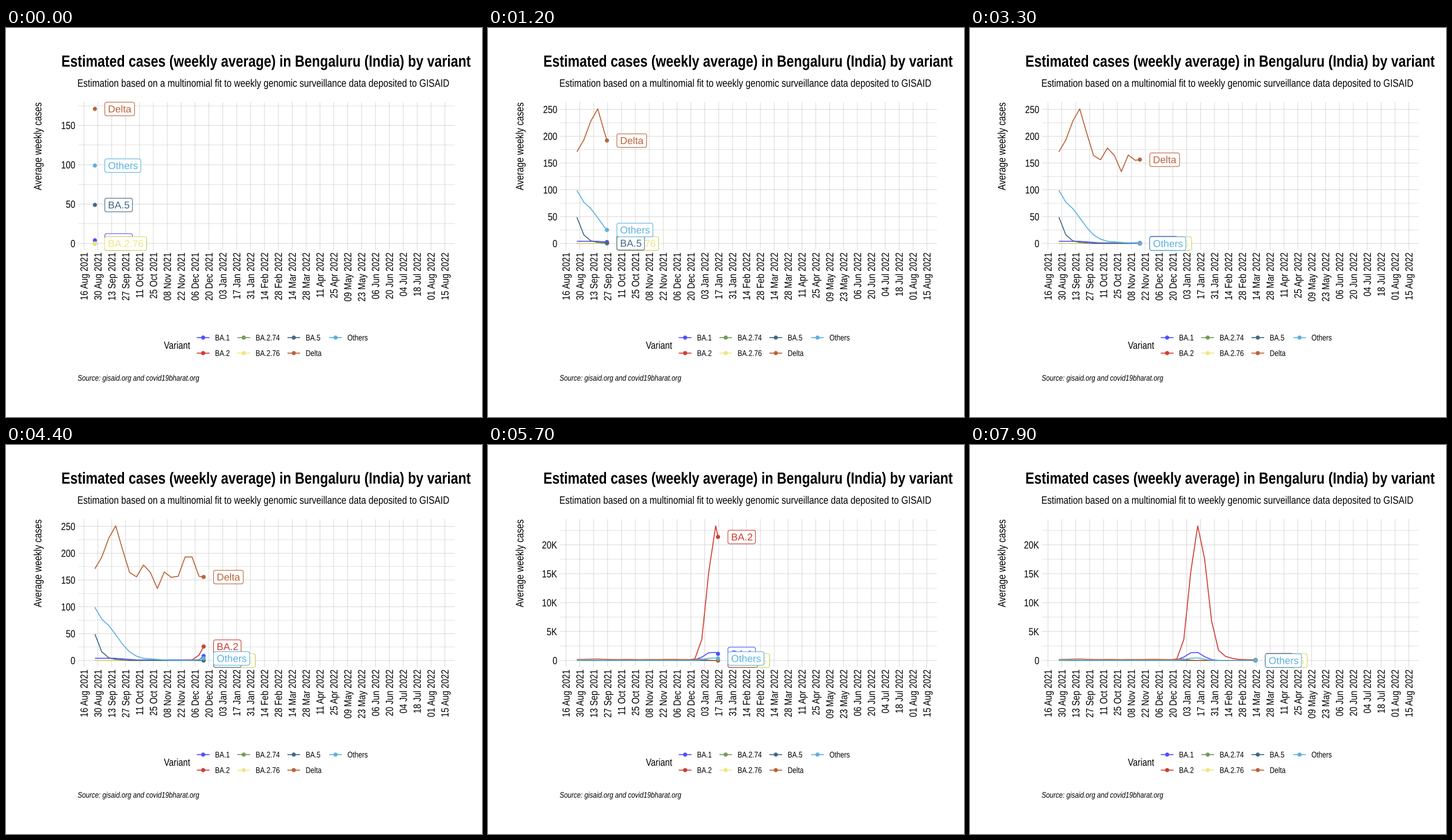
These frames come from a looping animation (827x677 px, 8 s). A matplotlib script:

```python
import math

import matplotlib.pyplot as plt
import numpy as np
from matplotlib.animation import FuncAnimation
from matplotlib.patches import Circle, FancyBboxPatch, PathPatch
from matplotlib.textpath import TextPath
from matplotlib.transforms import Affine2D

W, H, DPI = 827, 677, 100
FRAMES, INTERVAL = 80, 100
PX = 72 / DPI            # one pixel in points
PT = 1.565               # pixels per typographic point of the layout
NARROW = 0.82            # condensed face

LEFT, RIGHT, TOP, BOTTOM = 125, 780, 129, 386.7
TICK0, DAY = 135.5, 24.115 / 14
START = TICK0 + 11 * DAY
WEEK = np.arange(30)
KEYS = np.round(2.8 * WEEK)   # each weekly value is pinned to a whole frame

COLORS = {"BA.1": "#5050FF", "BA.2": "#CE3D32", "BA.2.74": "#749B58",
          "BA.2.76": "#F0E685", "BA.5": "#466983", "Delta": "#BA6338",
          "Others": "#5DB1DD"}


def wave(peak, height, rise, fall=None, power=2):
    """Bell curve over the weeks, with its own width on each side."""
    d = WEEK - peak
    width = np.where(d < 0, rise, fall or rise)
    return height * np.exp(-np.abs(d / width) ** power)


def falloff(level, middle, rate):
    return level / (1 + np.exp(rate * (WEEK - middle)))


def weekly_cases():
    cases = {name: 0.0 * WEEK for name in COLORS}
    cases["BA.1"] = 1 + falloff(3, 4.5, 2) + wave(19.55, 1500, 1.6)
    cases["BA.2"] = (wave(20, 23260, 1.5, 1.78, 2.15) + wave(16, 28, 1)
                     + wave(23.3, 700, 1.8) + wave(27, 120, 2.5))
    cases["BA.5"] = 49 * np.exp(-1.1 * WEEK)
    cases["Delta"] = (falloff(155, 18.8, 3) + wave(1.05, 26.5, 1.4)
                      + wave(2.95, 92, 1.35) + wave(7.3, 28, 0.7)
                      - wave(9, 21, 0.6) + wave(10, 11, 0.4)
                      + wave(13.5, 56, 0.8) + wave(18, 110, 0.6))
    cases["Others"] = (wave(0, 35.5, 0.75) + wave(1, 70, 3) + wave(5, 4, 4)
                       + wave(16, 4, 1) + wave(19.6, 470, 1.5))
    return {name: np.round(v) for name, v in cases.items()}


CASES = weekly_cases()

fig = plt.figure(figsize=(W / DPI, H / DPI), dpi=DPI, facecolor="white")
ax = fig.add_axes([0, 0, 1, 1])
ax.set_xlim(0, W)
ax.set_ylim(H, 0)
ax.axis("off")


def text(s, x, y, px, ha=0, rot=0, color="black", narrow=NARROW, z=3,
         weight="normal", style="normal"):
    font = dict(family="Liberation Sans", weight=weight, style=style)
    path = TextPath((0, 0), s, size=px, prop=font)
    width = path.get_extents().x1
    place = (Affine2D().translate(-ha * width, 0).scale(narrow, -1)
             .rotate_deg(rot).translate(x, y))
    patch = PathPatch(place.transform_path(path), fc=color, lw=0, zorder=z)
    return ax.add_patch(patch), width


def line(xs, ys, color, px, z):
    return ax.plot(xs, ys, color=color, lw=px * PX, zorder=z, snap=False,
                   solid_capstyle="butt", solid_joinstyle="round")[0]


def grid(xs, ys, px=0.75):
    return line(xs, ys, "#cccccc", px, 1)


def dot(x, y, color, z):
    return ax.add_patch(Circle((x, y), 3.6, fc=color, lw=0, zorder=z))


def tag(name, x, y, z):
    color, size, pad = COLORS[name], 17.4, 5.5
    label, width = text(name, x + pad, y + 0.355 * size, size,
                        color=color, narrow=1, z=z + 0.01)
    box = FancyBboxPatch((x, y - 11.6), width + 2 * pad, 23.6,
                         boxstyle="round,pad=0,rounding_size=3.5",
                         fc="white", ec=color, lw=1.1 * PX, zorder=z)
    return ax.add_patch(box), label


def nice_step(lo, hi, target=5):
    """Tick step with the best mix of simplicity, coverage and density."""
    span, best = hi - lo, (-math.inf, 1)
    mag = math.floor(math.log10(span))
    for z in (mag - 1, mag):
        for i, q in enumerate((1, 5, 2, 2.5, 4, 3)):
            step = q * 10.0 ** z
            for first in (-step, 0):
                for k in range(2, 13):
                    last = first + step * (k - 1)
                    miss = (hi - last) ** 2 + (lo - first) ** 2
                    cover = 1 - 0.5 * miss / (0.1 * span) ** 2
                    ratio = (max(last, hi) - min(first, lo)) / (target - 1) / step
                    dense = 2 - max(ratio, 1 / ratio)
                    score = 0.25 * (1 - i / 5) + 0.2 * cover + 0.5 * dense
                    best = max(best, (score, step))
    return best[1]


def short(v):
    return f"{v / 1000:g}K" if v >= 1000 else f"{v:g}"


def static():
    text("Estimated cases (weekly average) in Bengaluru (India) by variant",
         96.2, 67.3, 18 * PT, weight="bold")
    text("Estimation based on a multinomial fit to weekly genomic "
         "surveillance data deposited to GISAID", 124, 102.3, 12 * PT)
    text("Average weekly cases", 61.5, 130, 12 * PT, ha=1, rot=-90)
    text("Source: gisaid.org and covid19bharat.org", 124.5, 613.8, 9 * PT,
         style="italic")

    first = np.datetime64("2021-08-16")
    for i in range(27):
        x = TICK0 + 14 * i * DAY
        grid([x, x], [TOP, BOTTOM])
        day = (first + 14 * i).astype(object)
        text(day.strftime("%d %b %Y"), x + 6.3, 391.5, 11.5 * PT, ha=1, rot=-90)

    text("Variant", 274.3, 558.3, 11.5 * PT)
    for i, (name, color) in enumerate(COLORS.items()):
        x, y = (342.5, 413, 500, 572.5)[i // 2], 538.8 + 27 * (i % 2)
        line([x - 11, x + 11], [y, y], color, 1.67, 3)
        dot(x, y, color, 4)
        text(name, x + 20.7, y + 5, 9.2 * PT)


live = []


def draw(frame):
    while live:
        live.pop().remove()

    now = np.interp(frame, KEYS, WEEK)
    t = np.append(np.arange(math.floor(now) + 1), now)
    xs = START + 7 * DAY * t
    curves = {name: np.interp(t, WEEK, v) for name, v in CASES.items()}
    top = max(c.max() for c in curves.values())
    lo, hi = -0.05 * top, 1.05 * top

    def ypix(v):
        return BOTTOM - (BOTTOM - TOP) * (v - lo) / (hi - lo)

    step = nice_step(lo, hi)
    for i in range(int(2 * hi / step) + 1):
        v = i * step / 2
        y, major = ypix(v), i % 2 == 0
        live.append(grid([LEFT, RIGHT], [y, y], 0.75 if major else 0.55))
        if major:
            live.append(text(short(v), 119.8, y + 6.4, 11.5 * PT, ha=1)[0])

    for i, (name, c) in enumerate(curves.items()):
        ys, color = ypix(c), COLORS[name]
        live.append(line(xs, ys, color, 1.67, 4 + i / 10))
        live.append(dot(xs[-1], ys[-1], color, 5 + i / 10))
        live.extend(tag(name, xs[-1] + 10 * DAY, ys[-1], 6 + i / 10))
    return live


static()
anim = FuncAnimation(fig, draw, frames=FRAMES, interval=INTERVAL,
                     repeat=True, repeat_delay=0, blit=False)
plt.show()
```
